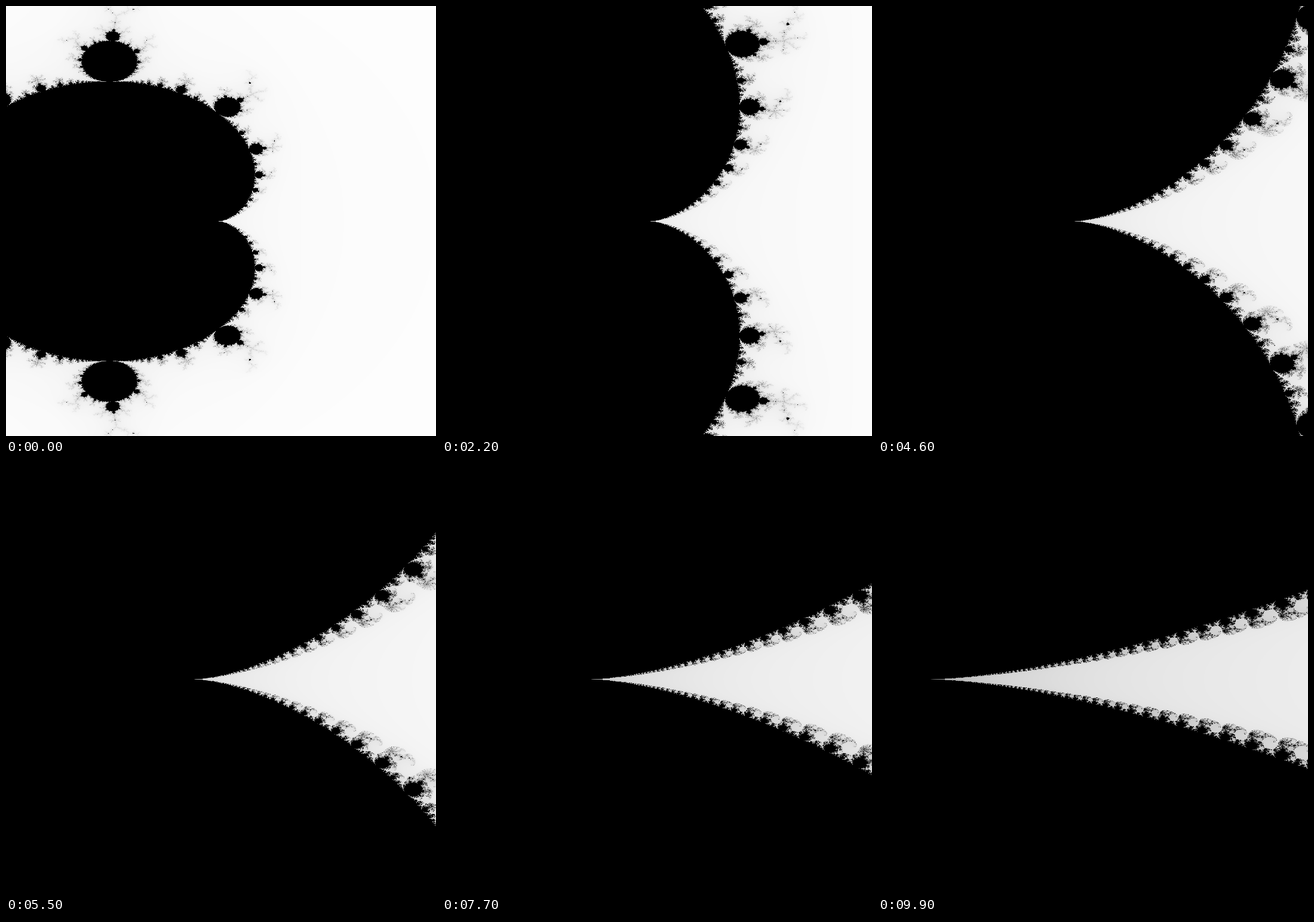
Animation, 720 px wide and 720 px high, one loop 10 s. Source, as an HTML page with a canvas:

```html
<!DOCTYPE html>
<html lang="en">
<head>
<meta charset="utf-8">
<title>Cusp zoom</title>
<style>
  html, body { margin: 0; width: 100%; height: 100%; overflow: hidden; background: #000; }
  canvas { display: block; width: 720px; height: 720px; }
</style>
</head>
<body>
<canvas id="view" width="720" height="720"></canvas>
<script>
const SIZE = 720, MID = SIZE / 2;
const STEPS = 100, STEP_MS = 100;
// The first view spans -0.48..1 across and -1..1 down
const CENTER = 0.26, HALF_W = 0.74, HALF_H = 1;
const SHRINK = 0.96;
const LIMIT = 255;

const ctx = document.getElementById('view').getContext('2d');
const image = ctx.createImageData(SIZE, SIZE);
const pixels = new Uint32Array(image.data.buffer);

// Closed forms for the main cardioid and the disc left of it
function isInside(x, y2) {
  const d = x - 0.25, q = d * d + y2;
  return q * (q + d) <= 0.25 * y2 || (x + 1) * (x + 1) + y2 <= 0.0625;
}

function escapeCount(cx, cy) {
  if (isInside(cx, cy * cy)) return LIMIT;
  let x = 0, y = 0, xx = 0, yy = 0, n = 0;
  while (n < LIMIT && xx + yy <= 4) {
    y = 2 * x * y + cy;
    x = xx - yy + cx;
    xx = x * x;
    yy = y * y;
    n++;
  }
  return n;
}

function draw(step) {
  const zoom = Math.pow(SHRINK, step);
  const dx = HALF_W * zoom / MID, dy = HALF_H * zoom / MID;
  for (let row = 0; row <= MID; row++) {
    const cy = (MID - row) * dy;
    const top = row * SIZE, bottom = (SIZE - row) * SIZE;
    for (let col = 0; col < SIZE; col++) {
      const shade = 255 - escapeCount(CENTER + (col - MID) * dx, cy);
      const color = (0xff000000 | shade * 0x010101) >>> 0;
      pixels[top + col] = color;
      if (row > 0) pixels[bottom + col] = color; // mirrored half
    }
  }
  ctx.putImageData(image, 0, 0);
}

const start = performance.now();
let shown = -1;

function tick() {
  const step = Math.floor((performance.now() - start) / STEP_MS) % STEPS;
  if (step !== shown) {
    shown = step;
    draw(step);
  }
  requestAnimationFrame(tick);
}
tick();
</script>
</body>
</html>
```
